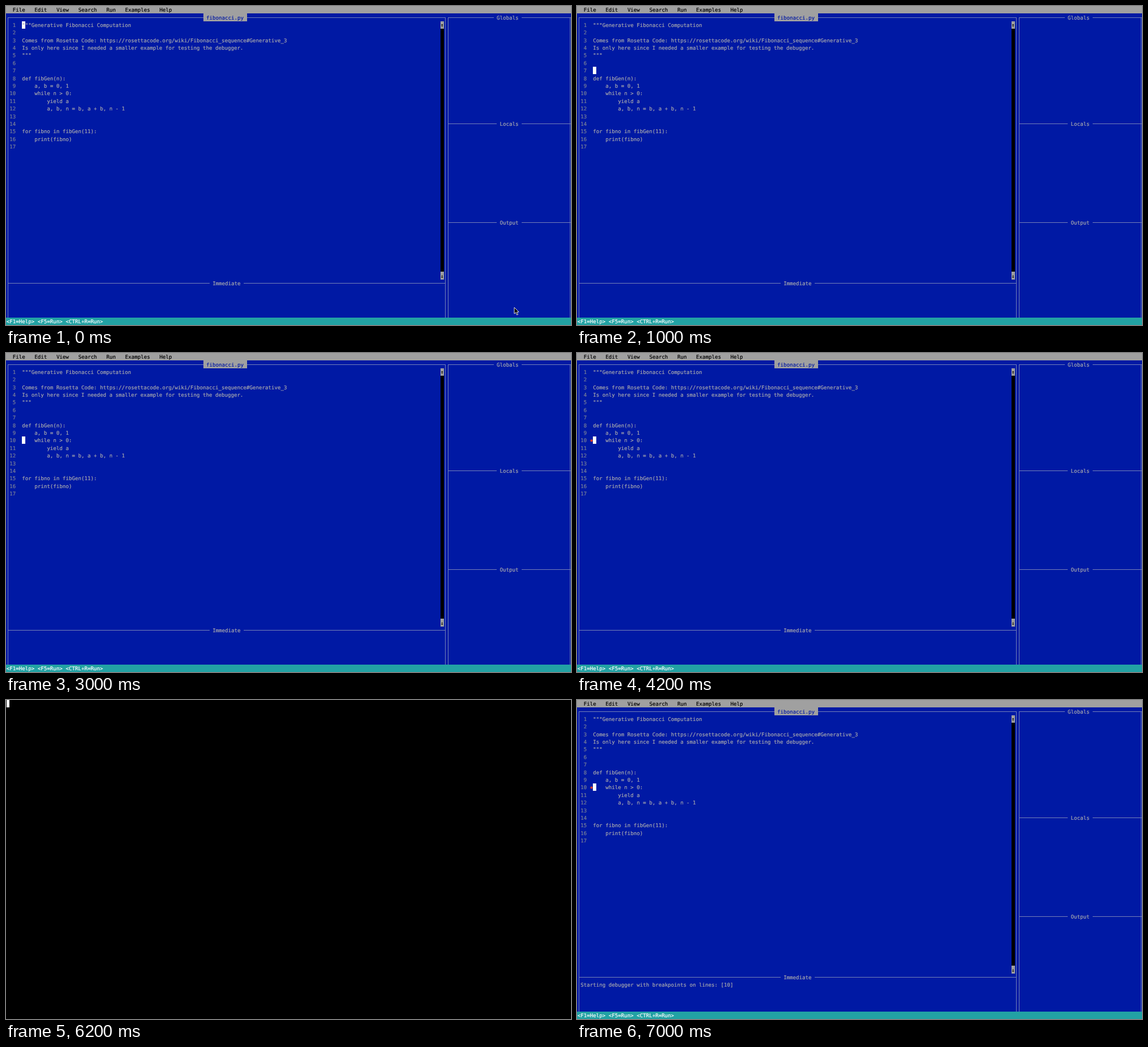
Write an HTML page that moves like this. It is 996x562 px and loops after 8000 ms.

```html
<!DOCTYPE html>
<html>
<head>
<meta charset="utf-8">
<style>
  html, body { margin: 0; width: 100%; height: 100%; overflow: hidden; background: #0019a4; }
  svg { display: block; }
  text {
    font: 9.145px "DejaVu Sans Mono", monospace;
    white-space: pre;
    text-rendering: geometricPrecision;
    stroke-width: .18px;
  }
  rect { shape-rendering: crispEdges; }
</style>
</head>
<body>
<svg id="stage" width="996" height="562" viewBox="0 0 996 562"></svg>
<script>
const CELL_W = 5.505, CELL_H = 562 / 42, LEFT = 0.8;
const BLUE = '#0019a4', GRAY = '#a0a0a0', TEXT = '#aaaaae', DIM = '#7c8298', RULE = '#7680b8';
const x = col => LEFT + col * CELL_W;
const y = row => row * CELL_H;
const stage = document.getElementById('stage');

function add(tag, attrs, content = '') {
  const el = document.createElementNS('http://www.w3.org/2000/svg', tag);
  for (const name in attrs) el.setAttribute(name, attrs[name]);
  el.textContent = content;
  return stage.appendChild(el);
}
const box = (left, top, width, height, fill) => add('rect', { x: left, y: top, width, height, fill });
const cells = (col, row, cols, rows, fill) => box(x(col), y(row), cols * CELL_W, rows * CELL_H, fill);
const write = (col, row, string, fill = TEXT, weight = 400) =>
  add('text', { x: x(col), y: y(row) + 10.2, fill, stroke: fill, 'font-weight': weight }, string);

function horizontal(row, from, to) {
  box(from, Math.floor(y(row + 0.5)), to - from, 1, RULE);
}
function vertical(col) {
  const top = Math.floor(y(1.5));
  box(Math.floor(x(col + 0.5)), top, 1, y(41) - top, RULE);
}
// A horizontal rule interrupted by a title.
function titledRule(row, from, to, col, title) {
  horizontal(row, from, x(col - 1));
  horizontal(row, x(col + title.length + 1), to);
  write(col, row, title);
}

const code = `"""Generative Fibonacci Computation

Comes from Rosetta Code: https://rosettacode.org/wiki/Fibonacci_sequence#Generative_3
Is only here since I needed a smaller example for testing the debugger.
"""


def fibGen(n):
    a, b = 0, 1
    while n > 0:
        yield a
        a, b, n = b, a + b, n - 1


for fibno in fibGen(11):
    print(fibno)
`;

// Menu bar
box(0, 0, 996, 13, GRAY);
[[2, 'File'], [9, 'Edit'], [16, 'View'], [23, 'Search'], [32, 'Run'], [38, 'Examples'], [49, 'Help']]
  .forEach(([col, label]) => write(col, 0, label, '#000'));

// Window frames
[0, 140, 141, 180].forEach(vertical);
horizontal(1, 4, 775);
cells(63, 1, 14, 1, GRAY);
write(64, 1, 'fibonacci.py', BLUE);
titledRule(36, 4, 775, 66, 'Immediate');
titledRule(1, 780, 996, 157, 'Globals');
titledRule(15, 780, 996, 158, 'Locals');
titledRule(28, 780, 996, 158, 'Output');

// Scroll bar
cells(139, 2, 1, 34, '#000');
[[2, '↑'], [35, '↓']].forEach(([row, arrow]) => {
  cells(139, row, 1, 1, GRAY);
  write(139, row, arrow, '#000');
});

// Editor
const cursor = box(28, 0, 6, 13, '#fff');
code.split('\n').forEach((line, i) => {
  write(1, i + 2, String(i + 1).padStart(2), DIM);
  write(5, i + 2, line);
});
const breakpoint = add('circle', { cx: 25.6, cy: 154.4, r: 2.1, fill: '#d83a2c' });
const message = write(1, 37, 'Starting debugger with breakpoints on lines: [10]');

// Status bar
box(0, 549, 996, 13, '#22a2a4');
write(0, 41, '<F1=Help> <F5=Run> <CTRL+R=Run>', '#fff', 700);

const pointer = add('path', {
  d: 'M896 531v11.2l2.6-2.4 2 4.4 1.9-.9-2-4.2h3.6z', fill: '#000', stroke: '#fff', 'stroke-width': 0.9
});

const blank = [box(0, 0, 996, 562, '#000'), box(1, 0, 5, 13, '#fff')];

const show = (el, visible) => el.setAttribute('visibility', visible ? 'visible' : 'hidden');

// Key repeat walks down to line 11, then one step back up.
function cursorLine(t) {
  if (t >= 2200) return 10;
  return Math.max(1, Math.min(11, 2 + Math.floor((t - 195) / 155)));
}

function draw(now) {
  const t = now % 8000;
  const tick = Math.floor(t / 200) * 200;
  cursor.setAttribute('y', Math.round(y(cursorLine(tick) + 1)));
  show(pointer, tick < 200);
  show(breakpoint, tick >= 4200);
  show(message, tick >= 6400);
  blank.forEach(el => show(el, tick === 6200));
  requestAnimationFrame(() => draw(performance.now()));
}
draw(performance.now());
</script>
</body>
</html>
```
